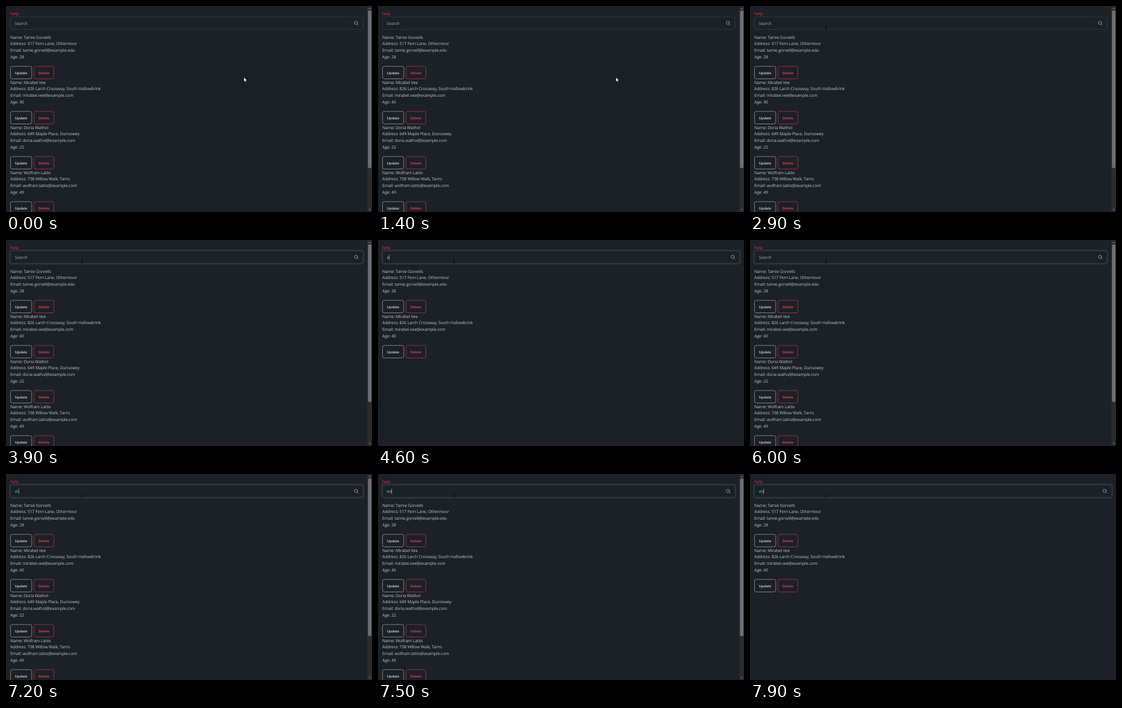
These frames come from a looping animation (600x338 px, 8000 ms). An HTML page:

```html
<!DOCTYPE html>
<html lang="en">
<head>
<meta charset="utf-8">
<title>People search</title>
<style>
  html, body { margin: 0; width: 100%; height: 100%; overflow: hidden; background: #1c2127; }
  svg { display: block; width: 600px; height: 338px; }
  text { font: 6.8px "Open Sans", "Noto Sans", sans-serif; letter-spacing: -.1px; fill: #bfc3c8; white-space: pre; text-rendering: geometricPrecision; }
  .btn { font: bold 5.9px "Liberation Sans", Arial, sans-serif; letter-spacing: 0; }
  .box { fill: none; stroke-width: .8; }
</style>
</head>
<body>
<svg viewBox="0 0 600 338">
  <text x="7" y="15" style="fill:#e62a44">help</text>
  <rect id="ring" x="6" y="16.7" height="22.8" rx="3.8" fill="none" stroke="#2b3137" stroke-width="1.9"/>
  <rect id="field" class="box" x="7.3" y="17.9" height="20.4" rx="2.8"/>
  <text id="query" x="14.6" y="31"></text>
  <rect id="caret" y="24" width=".6" height="8.8" fill="#b4b9be"/>
  <g id="lens" fill="none" stroke="#bfc3c7" stroke-width=".65" stroke-linecap="round">
    <circle cx="2.9" cy="2.9" r="2.6"/>
    <path d="M4.8 4.8L7 7"/>
  </g>
  <g id="list"></g>
  <g id="bar">
    <rect x="592.5" width="7.5" height="338" fill="#2a2c2e"/>
    <rect x="593.4" y="7.6" width="5.6" height="258" fill="#6d7175"/>
    <path d="M594.6 5L596.2 3.2L597.8 5ZM594.6 333L596.2 334.8L597.8 333Z" fill="#8b8f93"/>
  </g>
  <path id="arrow" d="M0 0V7.2L1.7 5.7L2.8 8.2L4 7.7L2.9 5.2H5.2Z" fill="#fff" stroke="#0b0d0f" stroke-width=".5"/>
  <path id="beam" d="M-1.2 -3H1.2M0 -3V3M-1.2 3H1.2" fill="none" stroke="#050607" stroke-width=".7"/>
</svg>
<script>
const LOOP = 8000, STEP = 100, PITCH = 74, LINE = 10.62;
const $ = id => document.getElementById(id);

const people = [
  ["Tamie Gorvells", "517 Fern Lane, Othermoor", "tamie.gorvell@example.edu", 28],
  ["Mirabel Vee", "826 Larch Crossway, South Hallowbrink", "mirabel.vee@example.com", 40],
  ["Doria Wathol", "649 Maple Place, Dunsowey", "doria.wathol@example.com", 22],
  ["Wolfram Lattis", "738 Willow Walk, Tarns", "wolfram.lattis@example.com", 49]
];
const labels = ["Name", "Address", "Email", "Age"];

const button = (x, w, label, line, ink) => `
  <rect class="box" x="${x}" y="99" width="${w}" height="20.5" rx="2.8" stroke="${line}"/>
  <text class="btn" x="${x + w / 2}" y="111.6" text-anchor="middle" style="fill:${ink}">${label}</text>`;

$("list").innerHTML = people.map((person, i) =>
  `<g transform="translate(0 ${i * PITCH})">` +
  person.map((value, j) => `<text x="7" y="${53.8 + j * LINE}">${labels[j]}: ${value}</text>`).join("") +
  button(7.4, 34.8, "Update", "#92979c", "#b9bdc2") +
  button(46, 32.4, "Delete", "#b03247", "#de3a52") +
  "</g>").join("");

// [time, value]: each value holds until the next row
const typed = [[0, ""], [4200, "e"], [5200, ""], [7000, "m"], [7500, "mi"]];
const shown = [[0, 4], [4600, 2], [5800, 4], [7800, 2]];
// [time, x, y] of the pointer
const path = [[0, 390, 117], [1600, 390, 117], [2500, 111, 61], [2900, 124.5, 35.2]];
const FOCUS = 3100;

const rowAt = (rows, t) => rows.filter(r => r[0] <= t).pop();
const ease = k => k * k * (3 - 2 * k);

function pointerAt(t) {
  const i = path.findIndex(p => p[0] > t);
  if (i < 0) return path[path.length - 1].slice(1);
  const [a, b] = [path[i - 1], path[i]];
  const k = ease((t - a[0]) / (b[0] - a[0]));
  return [a[1] + (b[1] - a[1]) * k, a[2] + (b[2] - a[2]) * k];
}

function render(t) {
  const [since, text] = rowAt(typed, t);
  const count = rowAt(shown, t)[1];
  const focus = Math.min(1, Math.max(0, (t - FOCUS) / 200));
  const right = count > 2 ? 585.4 : 593;

  [...$("list").children].forEach((g, i) => g.style.display = i < count ? "" : "none");
  $("bar").style.display = count > 2 ? "" : "none";
  $("field").setAttribute("width", right - 7.3);
  $("field").setAttribute("stroke", focus > .5 ? "#3c4349" : "#363c42");
  $("ring").setAttribute("width", right - 4.8);
  $("ring").style.opacity = focus;
  $("lens").setAttribute("transform", `translate(${right - 14.7} 24.7)`);

  const query = $("query");
  query.textContent = text || "Search";
  query.style.fill = text ? "#b9bdc2" : "#a6abb0";
  const blink = (t - Math.max(since, FOCUS)) % 1000 < 500;
  $("caret").style.display = t >= FOCUS && blink ? "" : "none";
  $("caret").setAttribute("x", 14.4 + (text ? query.getComputedTextLength() : 0));

  const [x, y] = pointerAt(t);
  const overText = t >= 2500;
  $("arrow").style.display = overText ? "none" : "";
  $("beam").style.display = overText ? "" : "none";
  for (const id of ["arrow", "beam"]) $(id).setAttribute("transform", `translate(${x} ${y})`);
}

const start = performance.now();
function tick() {
  const t = (performance.now() - start) % LOOP;
  render(Math.floor(t / STEP) * STEP);
  requestAnimationFrame(tick);
}
tick();
</script>
</body>
</html>
```
